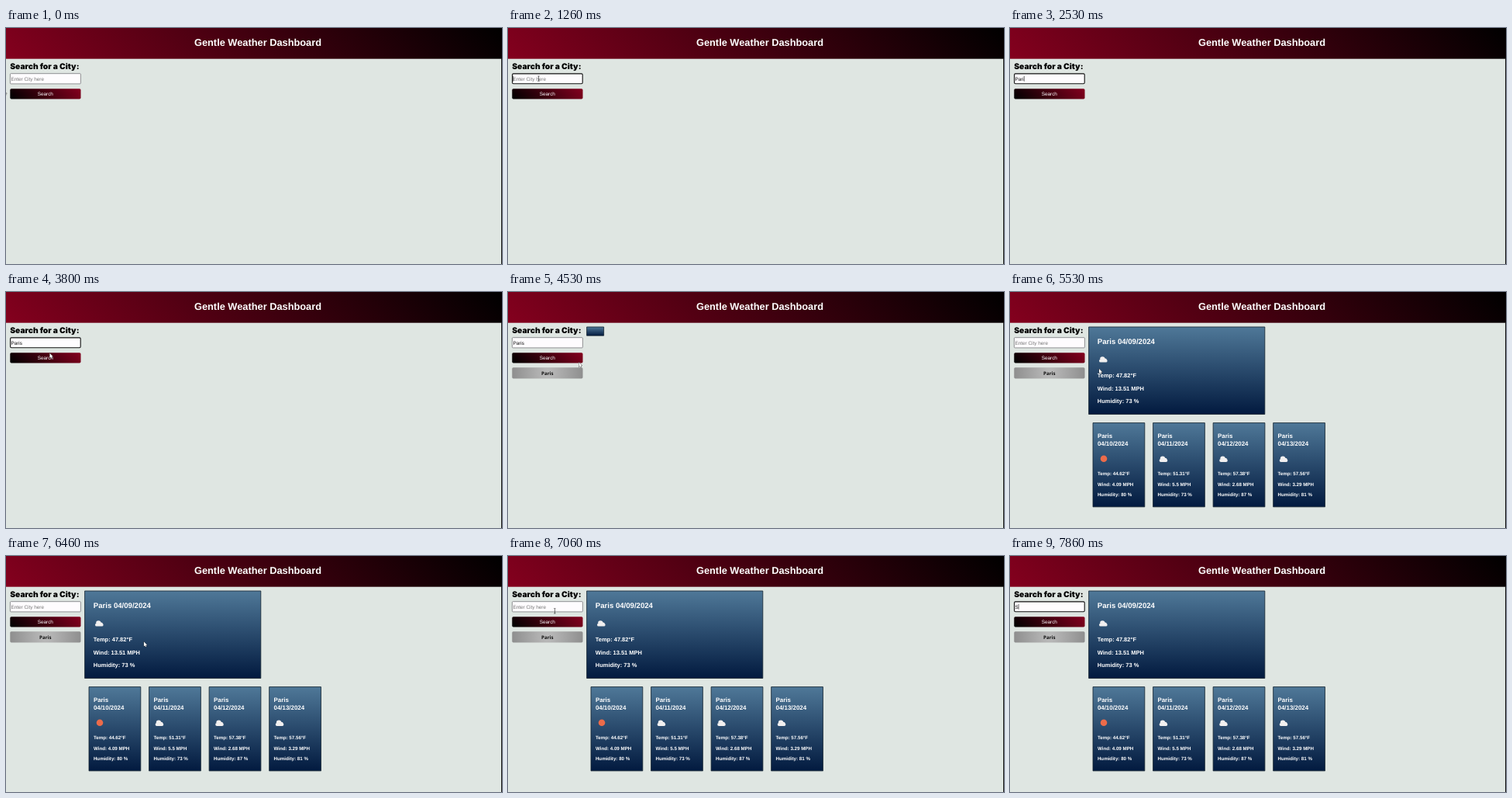
An HTML page with a canvas that plays this animation: 640x304 px, repeating every 8000 ms.

```html
<!DOCTYPE html>
<html lang="en">
<head>
<meta charset="utf-8">
<title>Weather dashboard</title>
<style>
  html, body { margin: 0; width: 100%; height: 100%; overflow: hidden; background: #dfe6e2; }
  canvas { display: block; }
</style>
</head>
<body>
<canvas id="stage" width="640" height="304"></canvas>
<script>
const ctx = document.getElementById('stage').getContext('2d');
const LOOP = 8000, STEP = 200 / 3;
const SANS = '"Liberation Sans", Arial, sans-serif';
const BURGUNDY = '#84001e';

const forecast = [
  ['04/10/2024', '44.62', '4.09', 80],
  ['04/11/2024', '51.31', '5.5', 73],
  ['04/12/2024', '57.38', '2.68', 87],
  ['04/13/2024', '57.56', '3.29', 81]
];

// Pointer keys: time, x, y of the tip
const pointerPath = [
  [0, -3, 80], [400, -3, 80], [870, 30, 87], [1330, 40, 64],
  [3530, 40, 64], [3930, 62, 84], [4130, 62, 84], [4530, 91.5, 90.5],
  [4800, 91.5, 90.5], [5530, 115, 99], [6460, 178, 110.5],
  [7260, 40, 64], [8000, 40, 64]
];

const within = (t, a, b) => t >= a && t < b;

function text(str, x, y, size, { color = '#fff', weight = 700, align = 'left', family = SANS } = {}) {
  ctx.font = `${weight} ${size}px ${family}`;
  ctx.fillStyle = color;
  ctx.textAlign = align;
  ctx.fillText(str, x, y);
}

function box(x, y, w, h, r, fill, stroke, line = 0.6) {
  ctx.beginPath();
  ctx.roundRect(x, y, w, h, r);
  ctx.fillStyle = fill;
  ctx.fill();
  if (!stroke) return;
  ctx.strokeStyle = stroke;
  ctx.lineWidth = line;
  ctx.stroke();
}

// Same geometry as a 45deg CSS gradient
function diagonal(x, y, w, h, from, to) {
  const cx = x + w / 2, cy = y + h / 2, d = (w + h) / 4;
  const g = ctx.createLinearGradient(cx - d, cy + d, cx + d, cy - d);
  g.addColorStop(0, from);
  g.addColorStop(1, to);
  return g;
}

function panel(x, y, w, h) {
  const g = ctx.createLinearGradient(0, y, 0, y + h);
  g.addColorStop(0, '#4f7898');
  g.addColorStop(1, '#021a3f');
  box(x, y, w, h, 0, g, '#14222e', 0.8);
}

function cloud(x, y) {
  ctx.fillStyle = '#f2f0f0';
  ctx.beginPath();
  ctx.roundRect(x - 5.3, y - 0.3, 10.6, 3.9, 1.9);
  ctx.arc(x - 1, y - 0.6, 3.2, 0, 7);
  ctx.arc(x + 2.4, y + 0.6, 2.2, 0, 7);
  ctx.fill();
}

function sun(x, y) {
  ctx.fillStyle = '#ec6b4a';
  ctx.beginPath();
  ctx.arc(x, y, 4.3, 0, 7);
  ctx.fill();
}

function readings(x, y, gap, size, temp, wind, humidity) {
  text(`Temp: ${temp}°F`, x, y, size);
  text(`Wind: ${wind} MPH`, x, y + gap, size);
  text(`Humidity: ${humidity} %`, x, y + 2 * gap, size);
}

function drawHeader() {
  ctx.fillStyle = '#dfe6e2';
  ctx.fillRect(0, 0, 640, 304);
  ctx.fillStyle = diagonal(0, 0, 640, 39.7, BURGUNDY, '#000');
  ctx.fillRect(0, 0, 640, 39.7);
  ctx.fillStyle = '#111';
  ctx.fillRect(639, 39, 1, 265);
  text('Gentle Weather Dashboard', 325, 23, 12.8, { align: 'center' });
}

function typed(t) {
  if (t >= 7850) return 'S';
  if (t >= 4720) return '';
  const keys = [1990, 2250, 2390, 2520, 2790];
  return 'Paris'.slice(0, keys.filter(k => t >= k).length);
}

function caretOn(t) {
  return within(t, 1250, 1650) || within(t, 1990, 3190) || within(t, 3320, 3800) ||
         within(t, 7250, 7590) || t >= 7850;
}

function drawForm(t) {
  text('Search for a City:', 5.2, 53, 10.3, { color: '#000', weight: 900, family: `Inter, ${SANS}` });

  const focused = within(t, 1250, 3990) || t >= 7250;
  if (focused) box(5.6, 58.9, 90.6, 12.8, 1.4, '#fefcfe', '#101010', 1.1);
  else box(5.4, 58.7, 91, 13.2, 1, '#fefcfe', '#77777c', 0.8);

  const value = typed(t);
  if (value) text(value, 6.4, 67.5, 6.4, { color: '#111', weight: 400 });
  else text('Enter City here', 6.4, 67.5, 6.4, { color: '#757575', weight: 400 });
  if (focused && caretOn(t)) {
    ctx.font = `400 6.4px ${SANS}`;
    ctx.fillStyle = '#111';
    ctx.fillRect(6.5 + ctx.measureText(value).width, 61.8, 0.6, 7);
  }

  box(5.3, 78.2, 91.2, 13.2, 1.6, diagonal(5.3, 78.2, 91.2, 13.2, '#000', BURGUNDY));
  text('Search', 50.8, 87, 6.4, { align: 'center', weight: 400 });
}

function drawHistory() {
  const g = ctx.createRadialGradient(51, 104, 0, 51, 104, 48);
  g.addColorStop(0, '#bcbcbc');
  g.addColorStop(1, '#8c8c8c');
  box(5.3, 97.2, 91.2, 14.2, 1.6, g);
  text('Paris', 50.8, 106.6, 6.2, { color: '#111', align: 'center', family: '"Open Sans", sans-serif' });
}

function drawWeather() {
  panel(101.6, 45, 227.2, 112.5);
  text('Paris 04/09/2024', 112.8, 67.3, 9.6);
  cloud(120.3, 87);
  readings(112.8, 110.4, 16.2, 7.488, '47.82', '13.51', 73);

  forecast.forEach(([date, temp, wind, humidity], i) => {
    const x = 107 + i * 77.55;
    panel(x, 168.6, 66.8, 108.2);
    text('Paris', x + 5.9, 188, 7.9);
    text(date, x + 5.9, 197.8, 7.9);
    if (i === 0) sun(x + 14, 214.8);
    else cloud(x + 13.4, 215.3);
    readings(x + 5.9, 236.2, 13.4, 6.2, temp, wind, humidity);
  });
}

function pointerAt(t) {
  const i = pointerPath.findIndex(k => k[0] > t);
  const [t0, x0, y0] = pointerPath[i - 1], [t1, x1, y1] = pointerPath[i];
  const p = (t - t0) / (t1 - t0), e = p * p * (3 - 2 * p);
  return [x0 + (x1 - x0) * e, y0 + (y1 - y0) * e];
}

function drawPointer(t) {
  if (within(t, 1650, 3590) || t >= 7590) return;
  const [x, y] = pointerAt(t);
  ctx.save();
  ctx.translate(x, y);
  ctx.beginPath();
  if (within(x, 5, 96) && within(y, 58, 72)) {
    ctx.rect(-0.3, -3.2, 0.6, 6.4);
    ctx.rect(-1.3, -3.4, 2.6, 0.5);
    ctx.rect(-1.3, 2.9, 2.6, 0.5);
    ctx.fillStyle = '#222';
    ctx.fill();
  } else {
    [[0, 0], [0, 5.8], [1.3, 4.7], [2.2, 6.6], [3.1, 6.2], [2.3, 4.3], [4.1, 4.2]]
      .forEach(([px, py]) => ctx.lineTo(px, py));
    ctx.closePath();
    ctx.strokeStyle = '#333';
    ctx.lineWidth = 0.8;
    ctx.stroke();
    ctx.fillStyle = '#fff';
    ctx.fill();
  }
  ctx.restore();
}

function render(now) {
  // The picture advances 15 times a second
  const t = Math.floor(((now % LOOP) + 8) / STEP) * STEP % LOOP;
  ctx.textRendering = 'geometricPrecision';
  drawHeader();
  drawForm(t);
  if (t >= 4050) drawHistory();
  if (t >= 4720) drawWeather();
  else if (t >= 4050) panel(101.6, 45, 22, 11.2);
  drawPointer(t);
}

let start;
function tick(now) {
  start ??= now;
  render(now - start);
  requestAnimationFrame(tick);
}
render(0);
requestAnimationFrame(tick);
</script>
</body>
</html>
```
